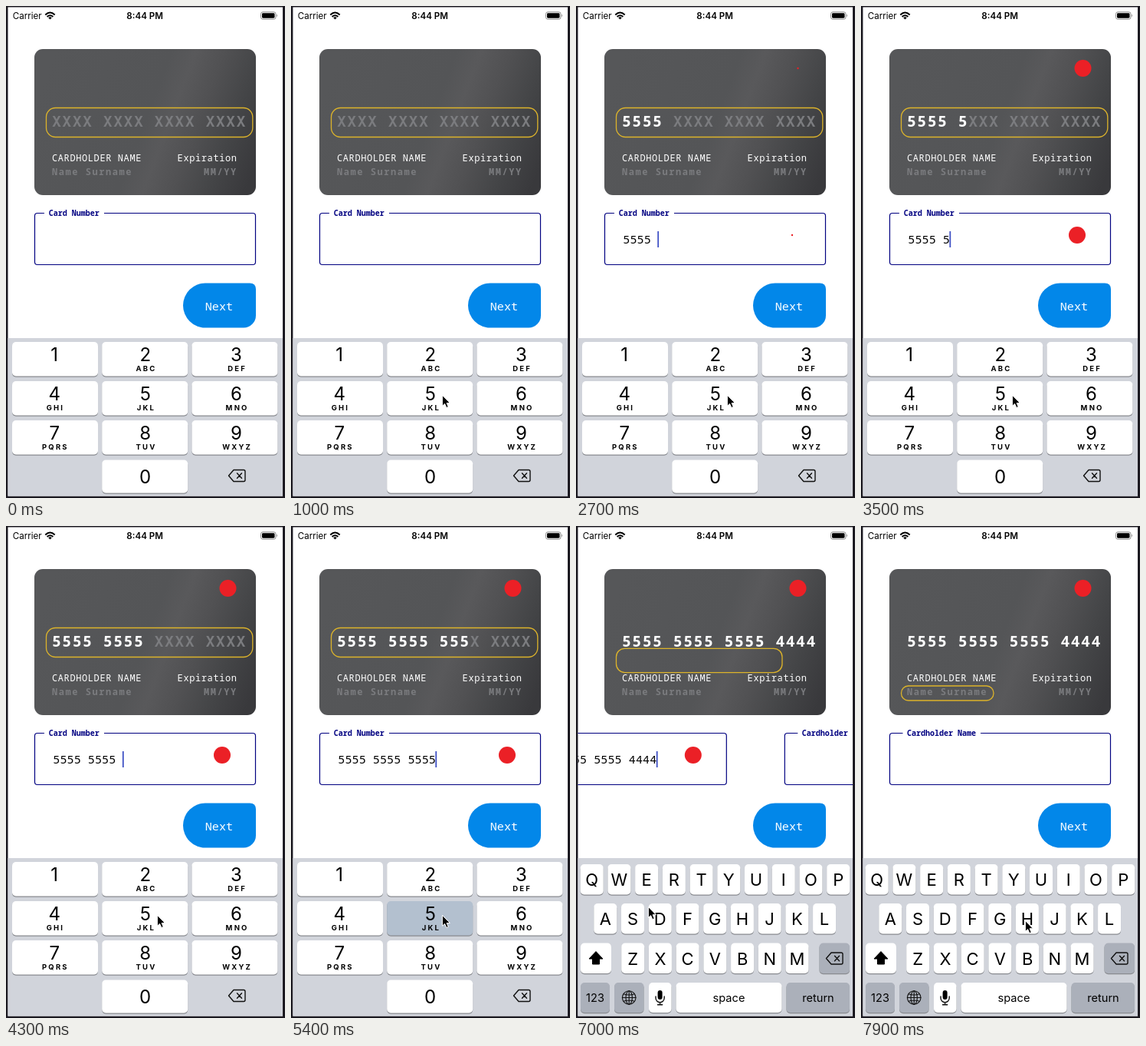
Animation, 364 px wide and 640 px high, one loop 8000 ms. Source, as an HTML page:

```html
<!DOCTYPE html>
<html lang="en">
<head>
<meta charset="utf-8">
<title>Card form</title>
<style>
  html, body { margin: 0; width: 100%; height: 100%; overflow: hidden; background: #1b1920; }
  svg { display: block; width: 364px; height: 640px; }
  text { font-family: Inter, Roboto, sans-serif; white-space: pre; }
  .mono { font-family: "Noto Sans Mono", "DejaVu Sans Mono", monospace; }
  .mid { text-anchor: middle; }
  .line { fill: none; stroke: #000080; stroke-width: 1.2; }
  .icon { fill: none; stroke: #111; stroke-width: 1.4; stroke-linecap: round; stroke-linejoin: round; }
</style>
</head>
<body>
<svg id="stage" viewBox="0 0 364 640"></svg>
<script>
const LOOP = 8000;
const LAG = 100;        // card and spacing follow the input
const ADVANCE = 6800;   // move on to the name field
const FOCUS = 7300;
const KEYBOARD = 7000;
const MASK = 'XXXX XXXX XXXX XXXX';
const NUMBER = '5555 5555 5555 4444';
const PITCH = 9.12;
const FAINT = '#7b7c7f';

// time of each digit
const taps = [1300, 1650, 2150, 2500, 3250, 3650, 3850, 4050,
              4500, 4800, 5050, 5350, 6000, 6190, 6375, 6560];

// pointer steps: time, x, y
const moves = [[420, 262, 578], [780, 197.4, 506.3], [5520, 197.4, 506.3], [5860, 94.4, 495.5],
               [7200, 94.4, 495.5], [7650, 214.4, 513.5]];

const clamp = v => Math.max(0, Math.min(1, v));
const ease = v => { v = clamp(v); return v * v * (3 - 2 * v); };
const lerp = (a, b, k) => a + (b - a) * k;
const $ = id => document.getElementById(id);

const text = (x, y, size, str, extra = '') =>
  `<text x="${x}" y="${y}" font-size="${size}" ${extra}>${str}</text>`;
const mono = (x, y, size, str, extra = '') => text(x, y, size, str, 'class="mono" ' + extra);

function key(x, y, w, h, fill = '#fff', id = '') {
  return `<rect x="${x}" y="${y + 1.2}" width="${w}" height="${h}" rx="5" fill="#898b90"/>
    <rect ${id && `id="${id}"`} x="${x}" y="${y}" width="${w}" height="${h}" rx="5" fill="${fill}"/>`;
}

const backspace = (x, y) => `<path class="icon" transform="translate(${x} ${y})"
  d="M-4.5-7.5H8.5Q10.5-7.5 10.5-5.5V5.5Q10.5 7.5 8.5 7.5H-4.5L-11 0ZM0-3.2L6 3.2M6-3.2L0 3.2"/>`;

function numberPad() {
  const letters = ['', 'ABC', 'DEF', 'GHI', 'JKL', 'MNO', 'PQRS', 'TUV', 'WXYZ'];
  let out = letters.map((l, i) => {
    const col = i % 3, y = 437 + Math.floor(i / 3) * 51;
    const mid = 63.2 + col * 118.6;
    return key(8 + col * 117.2, y, 112, 44.5, '#fff', 'key' + (i + 1)) +
      text(mid, y + 24.5, 24, i + 1, 'class="mid"') +
      text(mid + 1.2, y + 38, 9.5, l, 'class="mid" font-weight="700" letter-spacing="2.2"');
  }).join('');
  out += key(125.2, 590.5, 112, 43) + text(181.6, 620.5, 24, 0, 'class="mid"');
  return out + backspace(301.5, 611);
}

function letterPad() {
  const grey = '#abb0ba';
  const rows = [['QWERTYUIOP', 20.7, 440], ['ASDFGHJKL', 38.3, 491], ['ZXCVBNM', 74.2, 542.5]];
  let out = rows.map(([row, x0, y]) => [...row].map((c, i) => {
    const x = x0 + i * 35.72;
    return key(x - 15, y, 30, 39.5) + text(x, y + 28, 22, c, 'class="mid"');
  }).join('')).join('');
  out += key(6, 542.5, 40, 39.5) + key(317.5, 542.5, 39.5, 39.5, grey) + backspace(337.5, 562.5);
  out += '<path d="M26 553.5L35 563H30.5V570H21.5V563H17Z" stroke="#000" stroke-linejoin="round"/>';
  out += key(6, 594, 38, 39, grey) + key(50, 594, 38.5, 39, grey) + key(95, 594, 29.5, 39) +
    key(130.5, 594, 138, 39) + key(274.5, 594, 82.5, 39, grey);
  [[25, '123'], [199.5, 'space'], [316, 'return']].forEach(([x, s]) => {
    out += text(x, 618.5, 14.6, s, 'class="mid"');
  });
  out += `<g class="icon" style="stroke-width:1.1" transform="translate(69.2 613.5)">
    <circle r="8.8"/><ellipse rx="4.2" ry="8.8"/>
    <path d="M-8.8 0H8.8M0-8.8V8.8M-7.2-4.8Q0-2.2 7.2-4.8M-7.2 4.8Q0 2.2 7.2 4.8"/></g>`;
  out += `<rect x="106.6" y="604" width="6" height="12" rx="3"/>
    <path class="icon" d="M104 612V614A5.6 5.6 0 0 0 115.2 614V612M109.6 620V622.5M106.5 622.8H112.7"/>`;
  return out;
}

function field(label, left, right, x) {
  return `<path class="line" d="M${right} 269.5H322Q325.5 269.5 325.5 273V333Q325.5 336.5 322 336.5
      H41Q37.5 336.5 37.5 333V273Q37.5 269.5 41 269.5H${left}"/>` +
    mono(x, 273.3, 10, label, 'font-weight="700" fill="#000080"');
}

const dot = (id, x, y) => `<g transform="translate(${x} ${y})"><circle id="${id}" r="11" fill="#eb2026"/></g>`;
const caret = id => `<rect id="${id}" y="293" width="1.8" height="21" fill="#3f51c5"/>`;

$('stage').innerHTML = `
  <defs>
    <linearGradient id="shade" gradientUnits="userSpaceOnUse" x1="50" y1="95" x2="328" y2="200">
      <stop offset="0" stop-color="#565759"/><stop offset=".48" stop-color="#545557"/>
      <stop offset=".58" stop-color="#59595b"/><stop offset=".7" stop-color="#515153"/>
      <stop offset=".85" stop-color="#444547"/><stop offset="1" stop-color="#39393c"/>
    </linearGradient>
    <clipPath id="screen"><rect x="2.5" y="1.5" width="358.5" height="636"/></clipPath>
  </defs>
  <rect width="364" height="640" fill="#1b1920"/>
  <g clip-path="url(#screen)">
    <rect width="364" height="640" fill="#fff"/>
    ${text(8.8, 17, 11.6, 'Carrier')}
    ${text(181.2, 17, 11.6, '8:44 PM', 'class="mid" font-weight="600"')}
    <g fill="none" stroke="#000" stroke-width="2">
      <path d="M51.3 11.4Q57.5 5.6 63.7 11.4M53.6 14Q57.5 10.4 61.4 14"/>
    </g>
    <path d="M57.5 17.6L55.2 15.3Q57.5 13.4 59.8 15.3Z"/>
    <rect x="332.5" y="7.8" width="19.5" height="9.4" rx="2.6" fill="none" stroke="#8a8a8a"/>
    <rect x="334" y="9.3" width="16.5" height="6.4" rx="1.4"/>
    <path d="M353.3 10.8Q355.2 12.5 353.3 14.2Z" fill="#8a8a8a"/>

    <rect x="37" y="56" width="289" height="190" rx="11" fill="url(#shade)"/>
    ${dot('cardDot', 289.5, 81)}
    <text class="mono" x="60" y="157" font-size="20" font-weight="700" letter-spacing="1.36"
      fill="#fff"><tspan id="typed"></tspan><tspan id="mask" fill="${FAINT}"></tspan></text>
    ${mono(60, 202, 12, 'CARDHOLDER NAME', 'fill="#fff" letter-spacing=".6"')}
    ${mono(223.6, 202, 12, 'Expiration', 'fill="#fff" letter-spacing=".6"')}
    ${mono(60, 220.3, 12, 'Name Surname', `fill="${FAINT}" font-weight="600" letter-spacing="1.55"`)}
    ${mono(258, 220.3, 12, 'MM/YY', `fill="${FAINT}" font-weight="600" letter-spacing="1.55"`)}
    <rect id="focus" x="52.5" fill="none" stroke="#dcb32a" stroke-width="1.3"/>

    <g id="numberField">
      ${field('Card Number', 50, 128, 55.8)}
      ${mono(61.3, 309, 15.2, '', 'id="entry" font-weight="500"')}
      ${dot('fieldDot', 282, 298)}
      ${caret('numberCaret')}
    </g>
    <g id="nameField">
      ${field('Cardholder Name', 54.5, 156, 60)}
      ${caret('nameCaret')}
    </g>

    <path d="M260 360.5H318Q326 360.5 326 368.5V402.5A16 16 0 0 1 310 418.5H260A29 29 0 0 1 260 360.5Z"
      fill="#0287e9"/>
    ${mono(259.7, 395.8, 15.2, 'Next', 'fill="#fff"')}

    <rect y="432" width="364" height="208" fill="#d1d4db"/>
    <g id="numberPad">${numberPad()}</g>
    <g id="letterPad">${letterPad()}</g>
    <path id="pointer" d="M0 0V14L3.2 11.1L5.4 16.2L7.9 15.1L5.7 10.2H10Z"
      stroke="#fff" stroke-width="1"/>
  </g>`;

const set = (id, attrs) => {
  for (const name in attrs) $(id).setAttribute(name, attrs[name]);
};
const countAt = t => taps.filter(tap => tap <= t).length;
const blink = (t, since) => t >= since && (t - since) % 1000 < 550 ? 1 : 0;

// grouped length; a full group gains its space only once formatted
function lengthOf(n, formatted) {
  const full = Math.floor(n / 4);
  const open = n && n % 4 === 0 && (!formatted || n === 16);
  return n + full - (open ? 1 : 0);
}

function pointerAt(t) {
  const next = moves.findIndex(m => m[0] > t);
  if (next < 0) return moves[moves.length - 1].slice(1);
  const a = moves[Math.max(0, next - 1)], b = moves[next];
  const k = a === b ? 0 : ease((t - a[0]) / (b[0] - a[0]));
  return [lerp(a[1], b[1], k), lerp(a[2], b[2], k)];
}

function draw(t) {
  const n = countAt(t), shown = countAt(t - LAG);
  const cardLength = lengthOf(shown, false);
  $('typed').textContent = NUMBER.slice(0, cardLength);
  $('mask').textContent = MASK.slice(cardLength);

  const length = lengthOf(n, shown === n);
  $('entry').textContent = NUMBER.slice(0, length);
  set('numberCaret', { x: 60.7 + PITCH * length, opacity: blink(t, n ? taps[n - 1] : 400) });
  set('nameCaret', { x: 60.7, opacity: blink(t, FOCUS) });

  const grow = `scale(${ease((t - 2640) / 300)})`;
  set('cardDot', { transform: grow });
  set('fieldDot', { transform: grow });

  const lit = taps.findIndex(tap => t >= tap - 70 && t < tap + 100);
  set('key5', { fill: lit >= 0 && lit < 12 ? '#b3c0cf' : '#fff' });
  set('key4', { fill: lit >= 12 ? '#b3c0cf' : '#fff' });

  const k = ease((t - ADVANCE) / (FOCUS - ADVANCE));
  set('focus', {
    y: lerp(132.5, 208, k), width: lerp(269.3, 120.5, k),
    height: lerp(38, 19, k), rx: lerp(12, 9.2, k)
  });
  set('numberField', { transform: `translate(${-364 * k} 0)` });
  set('nameField', { transform: `translate(${364 * (1 - k)} 0)` });

  const letters = t >= KEYBOARD;
  set('numberPad', { display: letters ? 'none' : 'inline' });
  set('letterPad', { display: letters ? 'inline' : 'none' });

  const [x, y] = pointerAt(t);
  set('pointer', { transform: `translate(${x} ${y})`, opacity: t < moves[0][0] ? 0 : 1 });
}

const start = performance.now();
function tick() {
  draw((performance.now() - start) % LOOP);
  requestAnimationFrame(tick);
}
tick();
</script>
</body>
</html>
```
